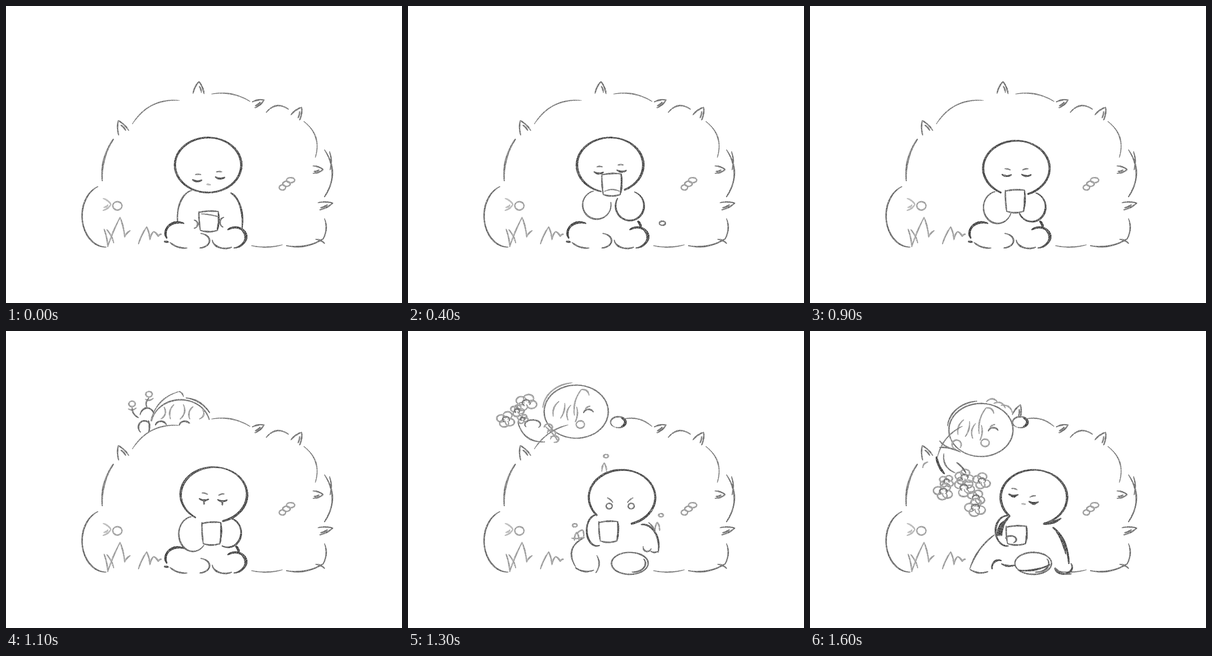
An HTML page with a canvas for the animation above (1700 ms loop, 864 by 648 pixels).

```html
<!DOCTYPE html>
<html lang="en">
<head>
<meta charset="utf-8">
<title>Pencil sketch</title>
<style>
html, body { margin: 0; width: 100%; height: 100%; overflow: hidden; background: #fff; }
canvas { display: block; width: 100vw; height: 100vh; }
</style>
</head>
<body>
<canvas id="stage" width="864" height="648"></canvas>
<script>
const W = 864, H = 648, STEP = 100, STEPS = 17, RAD = Math.PI / 180;
const ctx = document.getElementById('stage').getContext('2d');
ctx.lineCap = 'round';

function random(seed) {
  return () => (seed = (Math.imul(seed, 1664525) + 1013904223) >>> 0) / 4294967296;
}

// Paper grain: white specks laid over the finished drawing.
function makeGrain() {
  const c = document.createElement('canvas');
  c.width = W; c.height = H;
  const g = c.getContext('2d'), img = g.createImageData(W, H), rnd = random(7);
  for (let i = 0; i < img.data.length; i += 4) {
    img.data.fill(255, i, i + 3);
    img.data[i + 3] = rnd() ** 2 * 150;
  }
  g.putImageData(img, 0, 0);
  return c;
}
const grain = makeGrain();

// ---- Pencil ----
const pen = (width, grey) => ({ width, grey });
const heavy = pen(5.6, 50), dark = pen(4.4, 62), mid = pen(3.6, 88),
  line = pen(3.3, 100), thin = pen(2.8, 112), soft = pen(3.4, 145), pale = pen(3.6, 175);

const taper = t => 0.5 + 0.5 * Math.sqrt(Math.sin(Math.PI * t));

function trace(pts, { width, grey }, pressure = taper) {
  ctx.strokeStyle = `rgb(${grey},${grey},${grey})`;
  for (let i = 1; i < pts.length; i++) {
    const t = (i - 0.5) / (pts.length - 1);
    ctx.lineWidth = width * pressure(t) * (0.94 + 0.1 * Math.sin(t * 11 + pts[0][0]));
    ctx.beginPath();
    ctx.moveTo(...pts[i - 1]);
    ctx.lineTo(...pts[i]);
    ctx.stroke();
  }
}

const sample = (n, point) => Array.from({ length: n + 1 }, (_, i) => point(i / n));

function arc(x, y, rx, ry, from, to, p, pressure) {
  trace(sample(48, t => {
    const a = (from + (to - from) * t) * RAD;
    return [x + rx * Math.cos(a), y + ry * Math.sin(a)];
  }), p, pressure);
}

const oval = (x, y, rx, ry, p) => arc(x, y, rx, ry, -60, 310, p, () => 0.9);

// Curved stroke between two points; a positive bend swings to the left of travel.
function bow(x1, y1, x2, y2, bend = 0, p = line) {
  const dx = x2 - x1, dy = y2 - y1, len = Math.hypot(dx, dy) || 1;
  trace(sample(24, t => {
    const k = 4 * t * (1 - t) * bend / len;
    return [x1 + dx * t + dy * k, y1 + dy * t - dx * k];
  }), p);
}

function zigzag(p, ...pts) {
  for (let i = 1; i < pts.length; i++) bow(...pts[i - 1], ...pts[i], 1.5, p);
}

// Pointed leaf given by its tip, direction, length and half width.
function leaf(x, y, angle, len, half, p = line) {
  const c = Math.cos(angle * RAD), s = Math.sin(angle * RAD);
  const base = (back, side) => [x - c * back - s * side, y - s * back + c * side];
  bow(...base(len, -half), x, y, 2, p);
  bow(x, y, ...base(len, half), 2, p);
  bow(...base(len * 0.4, half * 0.1), ...base(len * 0.9, half * 0.5), 1, p);
}

// Scribbled flower: overlapping petals round a centre.
function flower(x, y, r, petals = 4) {
  const rnd = random(Math.round(x * 31 + y));
  for (let i = 0; i < petals; i++) {
    const a = (i + rnd() * 0.5) * 2 * Math.PI / petals;
    const start = a / RAD - 150;
    arc(x + Math.cos(a) * r * 0.72, y + Math.sin(a) * r * 0.62, r * 0.65, r * 0.52, start, start + 310, soft);
  }
  arc(x, y, r * 0.5, r * 0.4, 120, 390, line);
}

// ---- Timing ----
const mix = (a, b, u) => a.map((v, i) => v + (b[i] - v) * u);

// Builds f => values from [step, ...values] stops.
const keys = (...stops) => f => {
  let i = 0;
  while (i < stops.length - 1 && f >= stops[i + 1][0]) i++;
  const a = stops[i], b = stops[i + 1] || a;
  return mix(a, b, a === b ? 0 : Math.max(0, (f - a[0]) / (b[0] - a[0]))).slice(1);
};

// ---- Bush ----
function bush(f) {
  arc(218, 458, 52, 68, 250, 90, mid);
  bow(234, 291, 210, 381, -8, pen(4.5, 100));
  if (f < 13) bow(276, 257, 378, 206, 17, thin);
  if (f === 13) bow(276, 257, 349, 205, 9, thin);
  bow(f < 13 ? 449 : 470, 192, 532, 208, 8, thin);
  bow(568, 232, 616, 225, 11);
  bow(650, 252, 675, 330, 14, thin);
  bow(695, 314, 695, 416, 17, mid);
  bow(706, 318, 707, 357, 3, line);
  bow(695, 464, 692, 508, 5, line);
  bow(692, 508, 612, 523, 8, mid);
  bow(676, 509, 695, 518, 2);
  bow(536, 523, 603, 521, -4, thin);

  leaf(245, 250, 246, 29, 12);
  if (f < 10) leaf(421, 165, 272, 26, 12);
  leaf(645, 221, 302, 26, 11);
  leaf(563, 205, 335, 25, 7);
  leaf(692, 357, 0, 22, 8);
  leaf(713, 430, 347, 31, 8);
  leaf(229, 433, 0, 17, 13, pale);
  oval(243, 436, 10, 9, soft);
  for (let i = 0; i < 3; i++) oval(621 - i * 9, 380 + i * 8, 9 - i, 5.5, soft);

  zigzag(soft, [214, 487], [222, 525], [249, 461], [259, 504], [271, 490]);
  bow(220, 488, 235, 517, 2, soft);
  zigzag(soft, [289, 519], [307, 482], [314, 510], [322, 492], [332, 503], [339, 498]);
}

// Bud that pushes up beside the figure.
function sprout(f) {
  if (f === 4) oval(555, 474, 6.5, 4.5, line);
  if (f > 4 && f < 9) {
    arc(556, 499, 14, 18, 180, 360, line);
    bow(541, 501, 557, 500, 0, line);
    arc(565, 495, 6, 6, 60, 200, line);
  }
}

// ---- Seated figure ----
// Head: centre, then the angles where the open outline stops and starts.
const headAt = keys([0, 441, 347, 90, 90], [4, 441, 347, 64, 106], [6, 441, 347, 64, 106],
  [7, 447, 351, 64, 112], [11, 453.5, 357, 74, 124], [13, 467, 363, 73, 140],
  [14, 478, 373, 74, 139], [16, 488.5, 363, 72, 138]);
// Arms: centre, radii and sweep of an arc.
const leftArm = keys([0, 410, 462, 36, 60, 262, 168], [4, 412, 434, 31, 31, 256, -10],
  [7, 411, 436, 31, 32, 256, -5], [11, 408, 443, 31, 38, 262, 40],
  [13, 412, 435, 22, 34, 262, 75], [14, 419, 433, 25, 26, 262, 70], [16, 430, 436, 25, 33, 285, 85]);
const rightArm = keys([0, 482, 470, 34, 64, -75, 15], [4, 484, 436, 31, 32, -70, 210],
  [7, 484, 437, 31, 32, -70, 200], [11, 484, 440, 29, 32, -75, 115],
  [13, 512, 470, 35, 48, -95, 15], [14, 530, 480, 43, 58, -83, 15], [16, 505, 515, 60, 95, -65, -5]);
// Cup: centre, width, height. Eyes: middle, half spacing, half slant, brow frown.
const cupAt = keys([0, 442, 469, 42, 41], [4, 444, 389, 42, 45], [7, 446, 409, 42, 46],
  [11, 448, 441, 41, 46], [13, 437, 437, 41, 42], [14, 448, 439, 38, 36], [16, 450, 445, 44, 38]);
const eyesAt = keys([0, 442, 378, 25, -3, 0], [4, 441, 362, 25, -2, 0], [7, 449, 370, 23, -1, 2],
  [11, 452, 369, 20, 1, 3], [13, 463, 382, 24, 0, 10], [14, 470, 402, 19, 0, 6], [16, 466, 366, 22, 8, 3]);

function head(f) {
  const [x, y, stop, start] = headAt(f);
  arc(x, y, 72.5, 60, start, stop + 360, pen(1, 55), t => {
    const a = (start + (stop + 360 - start) * t) * RAD;
    return 3.2 + 2.4 * Math.abs(Math.cos(a - 0.3));
  });
}

function face(f) {
  const [x, y, half, slant, frown] = eyesAt(f);
  for (const side of [-1, 1]) {
    const ex = x + side * half, ey = y + side * slant;
    if (f === 13 || f === 14) {
      oval(ex, ey, 6.5, 6, f === 13 ? line : soft);
    } else {
      bow(ex - 10, ey - 2, ex + 10, ey - 1, -3, dark);
      if (f > 10 && f < 13) bow(ex, ey, ex, ey + 10, 0, mid);
      if (f > 14) bow(ex - 4, ey + 1, ex + 4, ey + 2, -1, heavy);
    }
    const bx = ex - side * 2, by = ey - 13;
    bow(bx - 6, by - frown * (side < 0 ? 0.5 : -0.5), bx + 6, by + frown * (side < 0 ? 0.5 : -0.5), 1, thin);
  }
  if (f < 2 || f > 14) bow(x - 4, y + 11, x + 4, y + 12, 0, pale);
}

function cup(f) {
  const [x, y, w, h] = cupAt(f), l = x - w / 2, r = x + w / 2, top = y - h / 2, low = y + h / 2;
  bow(l, top + 2, r, top, 2, mid);
  bow(l, top, l + 3, low, -1, mid);
  bow(r, top, r - 2, low, 2, dark);
  bow(l + 3, low, r - 2, low, -3, mid);
  if (f < 3) bow(l + 5, top + 5, r, top + 11, 1, thin);
  else if (f < 6) bow(l + 6, low - 7, r - 3, low - 7, 4, thin);
  if (f < 3) {
    arc(l - 12, y + 7, 9, 9, -80, 80, line);
    arc(r + 14, y + 3, 10, 11, 260, 110, line);
  } else if (f > 13) {
    arc(x - 12, y + 10, 12, 8, 200, 420, mid);
  }
}

function crossedLegs(f) {
  arc(376, 496, 28, 24, 295, 155, heavy);
  bow(346, 514, 354, 515, 0, dark);
  bow(358, 516, 395, 528, -4, mid);
  arc(421, 512, 23, 16, -80, 85, mid);
  arc(478, 509, 28, 20, 175, 60, mid);
  arc(500, 504, 24, 21, -130, 60, heavy);
  arc(495, 505, 27, 23, -40, 85, dark);
  if (f > 2) bow(502, 470, 508, 482, 1, heavy);
}

// Open legs: hip, ankle, bend of the shin, then the resting foot.
const shinAt = keys([13, 384, 451, 366, 515, -18, 484], [14, 398, 452, 366, 521, -17, 495],
  [16, 402, 445, 349, 518, -7, 487]);

function openLegs(f) {
  const [hx, hy, ax, ay, bend, foot] = shinAt(f);
  bow(hx, hy, ax, ay, bend, f === 14 ? heavy : mid);
  bow(ax, ay + 2, ax + 39, ay + 7, -5, mid);
  if (f < 15) bow(ax + 46, 490, ax + 44, 527, f === 13 ? 6 : -4, line);
  else {
    arc(412, 516, 15, 16, 170, 290, dark);
    bow(418, 508, 446, 511, -3, dark);
  }
  oval(foot, 507, 40, 24, mid);
  arc(foot + 7, 507, 27, 19, -30, 95, mid);
  if (f > 14) bow(foot - 32, 522, foot + 36, 510, -5, dark);
}

function restingHand(f) {
  if (f === 13) {
    arc(522, 472, 9, 9, 190, 20, line);
    bow(530, 481, 545, 481, -2, line);
    return;
  }
  const low = f > 14;
  bow(low ? 534 : 504, 431, 558, 486, low ? 3 : 18, dark);
  arc(low ? 553 : 556, low ? 515 : 494, 19, low ? 15 : 13, -30, 170, dark);
  bow(535, low ? 517 : 487, 570, low ? 530 : 500, -5, mid);
  if (low) {
    bow(510, 421, 547, 409, -3, heavy);
    for (let i = 0; i < 3; i++) bow(434 - i * 4, 406 + i * 4, 418 - i * 4, 446, -5, heavy);
  }
}

function alarm() {
  for (const [x, y, lean] of [[432, 273, -4], [552, 402, -8], [364, 424, 4]]) {
    oval(x, y, 5, 3.6, soft);
    zigzag(soft, [x + lean - 5, y + 33], [x + lean, y + 15], [x + lean + 5, y + 33]);
  }
  zigzag(soft, [369, 442], [381, 434], [383, 450], [357, 452]);
  bow(525, 418, 540, 440, 2, line);
}

function figure(f) {
  head(f);
  face(f);
  arc(...leftArm(f), f > 12 ? dark : mid);
  arc(...rightArm(f), f > 13 ? heavy : dark);
  cup(f);
  if (f < 13) crossedLegs(f);
  else {
    openLegs(f);
    restingHand(f);
  }
  if (f === 13) alarm();
}

// ---- Visitor above the bush ----
function peek() {
  arc(381, 206, 64, 56, 190, 355, line);
  bow(316, 196, 378, 132, 13, thin);
  bow(378, 132, 387, 143, 2, thin);
  bow(393, 146, 444, 178, 7, mid);
  for (let i = 0; i < 5; i++) bow(345 + i * 21, 166 - 6 * Math.sin(i), 338 + i * 21, 192, i % 2 ? -5 : 6, soft);
  for (const x of [338, 390]) arc(x, 207, 12, 10, 190, 350, mid);
  for (const [x, y, lean] of [[275, 159, 14], [312, 138, -4]]) {
    oval(x, y, 7, 6, soft);
    bow(x - 8, y + 11, x + 9, y + 9, -3, soft);
    bow(x, y + 8, x + lean, y + 30, -4, line);
  }
  arc(308, 188, 16, 20, 195, 335, mid);
  arc(302, 210, 13, 14, 130, 340, mid);
  bow(311, 196, 311, 222, 2, mid);
}

// Hides what sits below the top edge of the bush.
function hideBelowBush() {
  ctx.fillStyle = '#fff';
  ctx.beginPath();
  ctx.moveTo(276, 257);
  ctx.quadraticCurveTo(310, 200, 378, 206);
  ctx.lineTo(449, 193);
  ctx.lineTo(449, 265);
  ctx.fill();
}

const visitorAt = keys([12, 369, 139], [13, 367, 176], [14, 374, 200], [16, 373, 216]);

function visitorHead(f) {
  const [x, y] = visitorAt(f);
  oval(x, y, 70, 58, line);
  arc(x - 3, y - 4, 70, 59, 185, 265, f === 13 ? soft : line);
  for (let i = 0; i < 4; i++) bow(x - 38 + i * 13, y - 22 + i * 4, x - 50 + i * 16, y + 10 + i * 4, i % 2 ? 3 : -5, soft);
  bow(x + 11, y - 48, x - 4, y + 8, -6, soft);
  bow(x + 11, y - 48, x + 28, y - 36, 5, soft);
  arc(x + 27, y + 4, 11, 9, 190, 340, line);
  bow(x + 20, y - 6, x + 30, y - 12, 1, soft);
  oval(x + 9, y + 28, 9, 8, soft);

  const bun = y < 150 ? 163 : 199;
  arc(459, bun, 17, 12, 120, 470, line);
  arc(458, bun, 16, 11, -60, 60, heavy);
  if (f > 13) leaf(459, 161, -70, 26, 9);
}

function wave(dx, dy) {
  ctx.save();
  ctx.translate(dx, dy);
  for (const [x, y, r] of [[258, 157, 17], [238, 174, 11], [214, 193, 15], [250, 192, 9]]) flower(x, y, r);
  bow(240, 200, 298, 242, -14, line);
  arc(272, 204, 17, 10, 150, 400, line);
  for (let i = 0; i < 3; i++) arc(306 + i * 7, 210 + i * 13, 9, 7, 180, 460, soft);
  bow(299, 208, 327, 240, 2, soft);
  ctx.restore();
}

function lean() {
  for (const [x, y, r] of [[278, 177, 12], [250, 190, 16], [269, 205, 16], [246, 214, 15], [262, 229, 15], [221, 254, 21]]) flower(x, y, r);
  leaf(301, 236, 20, 28, 11);
  for (let i = 0; i < 3; i++) oval(324 - i * 3.5, 246 + i * 13, 8, 6.5, soft);
  zigzag(line, [301, 286], [300, 298], [311, 290], [318, 308]);
  bow(311, 290, 326, 300, -3, line);
}

function reach() {
  for (const [x, y, r] of [[298, 328, 12], [291, 350, 16], [337, 319, 15], [336, 342, 17], [375, 327, 15], [362, 364, 15], [361, 385, 17]]) flower(x, y, r);
  bow(332, 208, 278, 275, -10, thin);
  bow(276, 275, 293, 311, -3, heavy);
  bow(283, 254, 328, 264, 3, line);
  bow(283, 240, 313, 258, -3, line);
  bow(292, 268, 316, 309, -9, line);
  bow(320, 287, 340, 310, 2, mid);
  bow(246, 298, 257, 286, 3, soft);
  arc(320, 248, 10, 10, 100, 400, soft);
  for (let i = 0; i < 3; i++) bow(385 + i * 16, 154 + i * 4, 410 + i * 16, 156 + i * 12, 7, soft);
}

function visitor(f) {
  if (f === 10 || f === 11) {
    ctx.save();
    ctx.translate(0, (11 - f) * 20);
    peek();
    ctx.restore();
    hideBelowBush();
  }
  if (f < 12) return;
  visitorHead(f);
  if (f < 14) wave((13 - f) * 44, (f - 13) * 24);
  else if (f === 14) lean();
  else reach();
}

function render(f) {
  ctx.fillStyle = '#fff';
  ctx.fillRect(0, 0, W, H);
  visitor(f);
  bush(f);
  sprout(f);
  figure(f);
  ctx.drawImage(grain, 0, 0);
}

const origin = performance.now();
let shown = -1;
function loop() {
  const f = Math.floor((performance.now() - origin) / STEP) % STEPS;
  if (f !== shown) render(shown = f);
  requestAnimationFrame(loop);
}
loop();
</script>
</body>
</html>
```
